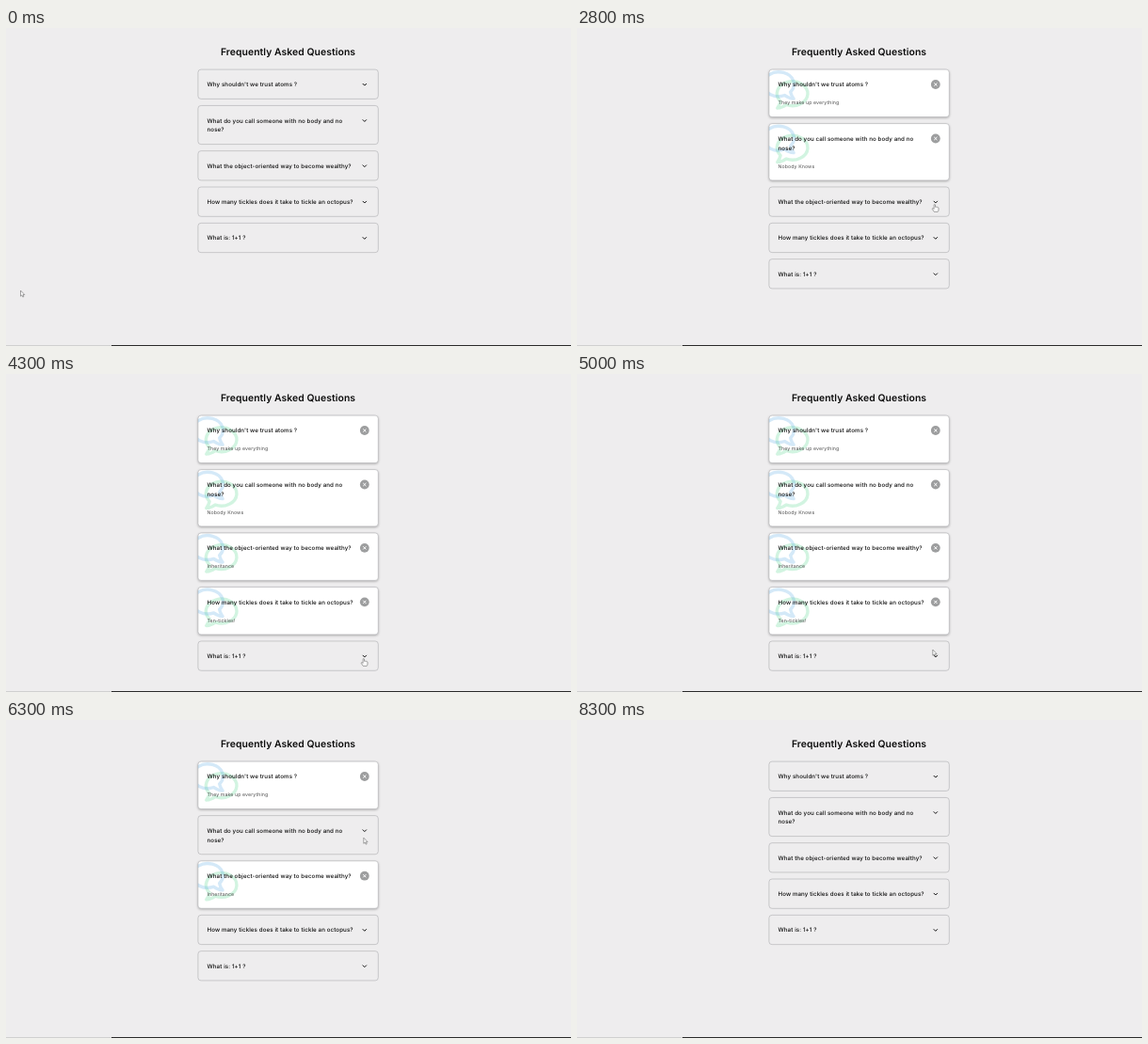
Recreate the animation shown at these times as an HTML page. Size 600 by 338 pixels, loop 8.8 s.

```html
<!DOCTYPE html>
<html lang="en">
<head>
<meta charset="utf-8">
<title>FAQ accordion</title>
<style>
  html, body { margin: 0; width: 100%; height: 100%; overflow: hidden; background: #eeedee; }
  svg { display: block; }
  #stage { width: 100vw; height: 100vh; }
  text { font-family: Inter, "Open Sans", sans-serif; text-rendering: geometricPrecision; }
  .title { font-size: 10.4px; font-weight: 600; letter-spacing: .06px; text-anchor: middle; fill: #0c0c0c; }
  .question { font-size: 6.2px; font-weight: 500; letter-spacing: .09px; fill: #0c0c0c; }
  .answer { font-size: 5.25px; letter-spacing: .08px; fill: #505050; }
  .card { fill: none; stroke: #b6b7b9; stroke-width: .7; }
  .open .card { fill: #fff; filter: drop-shadow(0 1px 1px rgba(0, 0, 0, .25)); }
  .open .chevron, .item:not(.open) .details { display: none; }
  .chevron, .cross { fill: none; stroke: #111; stroke-width: 1; stroke-linecap: round; stroke-linejoin: round; }
  .cross { stroke: #fff; }
  .badge { fill: #9d9e9f; }
  .bubble { opacity: .21; }
  .cursor { fill: #fafafa; stroke: #6a6a6a; stroke-width: .6; stroke-linejoin: round; }
</style>
</head>
<body>
<svg id="stage" viewBox="0 0 600 338">
  <defs>
    <g id="bubble" fill="none" stroke-width="3.4" stroke-linejoin="round">
      <path d="M11.2 26.2A16.3 12.9 0 1 0 5.2 22.6Q4.5 26.5 1.9 29.8Q7 29.6 11.2 26.2Z"/>
    </g>
  </defs>
  <rect width="600" height="338" fill="#eeedee"/>
  <g id="page">
    <text class="title" x="299.5" y="29.3">Frequently Asked Questions</text>
  </g>
  <g id="scrollbar">
    <rect x="595.2" width="4.8" height="337" fill="#f8f8f8"/>
    <rect x="596.2" y="5" width="2.8" height="320" rx="1" fill="#c1c1c1"/>
  </g>
  <rect y="337" width="600" height="1" fill="#2a2a2a"/>
  <rect y="337" width="112" height="1" fill="#d0d0d0"/>
  <path id="arrow" class="cursor" d="M0 0V6.1L1.4 4.9L2.4 7L3.4 6.5L2.5 4.5H4.3Z"/>
  <path id="hand" class="cursor" d="M-.7 .5Q0 -.5 .7 .5V2.9Q1.5 2.3 2 3.1Q2.8 2.7 3.2 3.4Q4.2 3.1 4.2 4.2V5.8Q4.2 7 3.4 8H-.5Q-1.6 6.6 -2.6 5Q-2.5 3.9 -1.5 4.4L-.7 5.1Z"/>
</svg>
<script>
const LOOP = 8800, STEP = 100, EXIT = 7800;
const LEFT = 203.9, TOP = 44.1, WIDTH = 191.4, GAP = 7.05;
const CLOSED = 31.3, LINE = 9.85, EXTRA = 19.15, VIEW = 334;
const TOGGLE = { x: 176.9, y: 15.9, reach: 5.2 };
const TRAVEL = .75; // share of each pause spent moving

const items = [
  { lines: ["Why shouldn't we trust atoms ?"], answer: "They make up everything" },
  { lines: ["What do you call someone with no body and no", "nose?"], answer: "Nobody Knows" },
  { lines: ["What the object-oriented way to become wealthy?"], answer: "Inheritance" },
  { lines: ["How many tickles does it take to tickle an octopus?"], answer: "Ten-tickles!" },
  { lines: ["What is: 1+1 ?"], answer: "Depends on who you are asking" }
];

// each click flips one item
const clicks = [
  { at: 1300, item: 0 }, { at: 2200, item: 1 }, { at: 3000, item: 2 },
  { at: 3600, item: 3 }, { at: 4500, item: 4 }, { at: 4905, item: 4 },
  { at: 5400, item: 3 }, { at: 6210, item: 1 }, { at: 6800, item: 2 },
  { at: 7500, item: 0 }
];

const $ = id => document.getElementById(id);
const ease = p => p * p * (3 - 2 * p);
const mix = (a, b, p) => a + (b - a) * p;

function add(parent, tag, attrs, text) {
  const el = document.createElementNS("http://www.w3.org/2000/svg", tag);
  for (const key in attrs) el.setAttribute(key, attrs[key]);
  if (text) el.textContent = text;
  return parent.appendChild(el);
}

function build(item) {
  const extraLines = (item.lines.length - 1) * LINE;
  const center = `translate(${TOGGLE.x} ${TOGGLE.y})`;
  item.height = CLOSED + extraLines;
  item.el = add($("page"), "g", {});
  item.card = add(item.el, "rect", { class: "card", width: WIDTH, rx: 3.2 });

  const details = add(item.el, "g", { class: "details" });
  const clip = add(details, "svg", { width: WIDTH, height: item.height + EXTRA, overflow: "hidden" });
  const bubble = (color, transform) =>
    add(clip, "use", { class: "bubble", href: "#bubble", stroke: color, transform });
  bubble("#2ecc71", "translate(7 11.2)");
  bubble("#3498db", "translate(28 1.2) scale(-1 1)");
  add(details, "text", { class: "answer", x: 9.6, y: 37.3 + extraLines }, item.answer);
  add(details, "circle", { class: "badge", r: 4.9, transform: center });
  add(details, "path", { class: "cross", d: "M-1.3 -1.3L1.3 1.3M1.3 -1.3L-1.3 1.3", transform: center });

  add(item.el, "path", { class: "chevron", d: "M-1.8 -.7L0 1.1L1.8 -.7", transform: center });
  item.lines.forEach((line, i) =>
    add(item.el, "text", { class: "question", x: 9.6, y: 18.1 + i * LINE }, line));
}

// Card positions after all clicks up to time t.
function layout(t) {
  let y = TOP;
  const cards = items.map((item, i) => {
    const flips = clicks.filter(c => c.item === i && c.at <= t).length;
    const open = flips % 2 === 1;
    const card = { y, open, height: item.height + (open ? EXTRA : 0) };
    y += card.height + GAP;
    return card;
  });
  const overflow = y - GAP > VIEW;
  return { cards, overflow, shift: overflow ? -2.4 : 0 };
}

// The pointer rests a little below each toggle it clicks, then leaves.
function planRoute() {
  const stops = clicks.map(({ at, item }) => {
    const { cards, shift } = layout(at - 1);
    return { at, x: LEFT + shift + TOGGLE.x - 1, y: cards[item].y + TOGGLE.y + 2.5 };
  });
  return [{ at: 0, x: 15.5, y: 279 }, ...stops, { at: 8000, x: 20, y: 230 }];
}

function pointerAt(t) {
  const next = route.findIndex(stop => stop.at > t);
  if (next < 0) return route[route.length - 1];
  const a = route[next - 1], b = route[next];
  const p = ease(Math.min(1, (t - a.at) / ((b.at - a.at) * TRAVEL)));
  return { x: mix(a.x, b.x, p), y: mix(a.y, b.y, p) };
}

function render(t) {
  const { cards, overflow, shift } = layout(t);
  const pointer = pointerAt(t);

  cards.forEach((card, i) => {
    const { el, card: box } = items[i];
    el.setAttribute("class", card.open ? "item open" : "item");
    el.setAttribute("transform", `translate(${LEFT} ${card.y})`);
    box.setAttribute("height", card.height);
  });
  $("page").setAttribute("transform", `translate(${shift} 0)`);
  $("scrollbar").style.display = overflow ? "" : "none";

  const hover = cards.some(card =>
    Math.hypot(pointer.x - LEFT - shift - TOGGLE.x, pointer.y - card.y - TOGGLE.y) < TOGGLE.reach);
  const shape = t >= EXIT ? "" : hover ? "hand" : "arrow";
  for (const id of ["arrow", "hand"]) {
    $(id).style.display = id === shape ? "" : "none";
    $(id).setAttribute("transform", `translate(${pointer.x} ${pointer.y})`);
  }
}

items.forEach(build);
const route = planRoute();
const start = performance.now();
function tick() {
  const t = (performance.now() - start) % LOOP;
  render(Math.floor(t / STEP) * STEP);
  requestAnimationFrame(tick);
}
tick();
</script>
</body>
</html>
```
